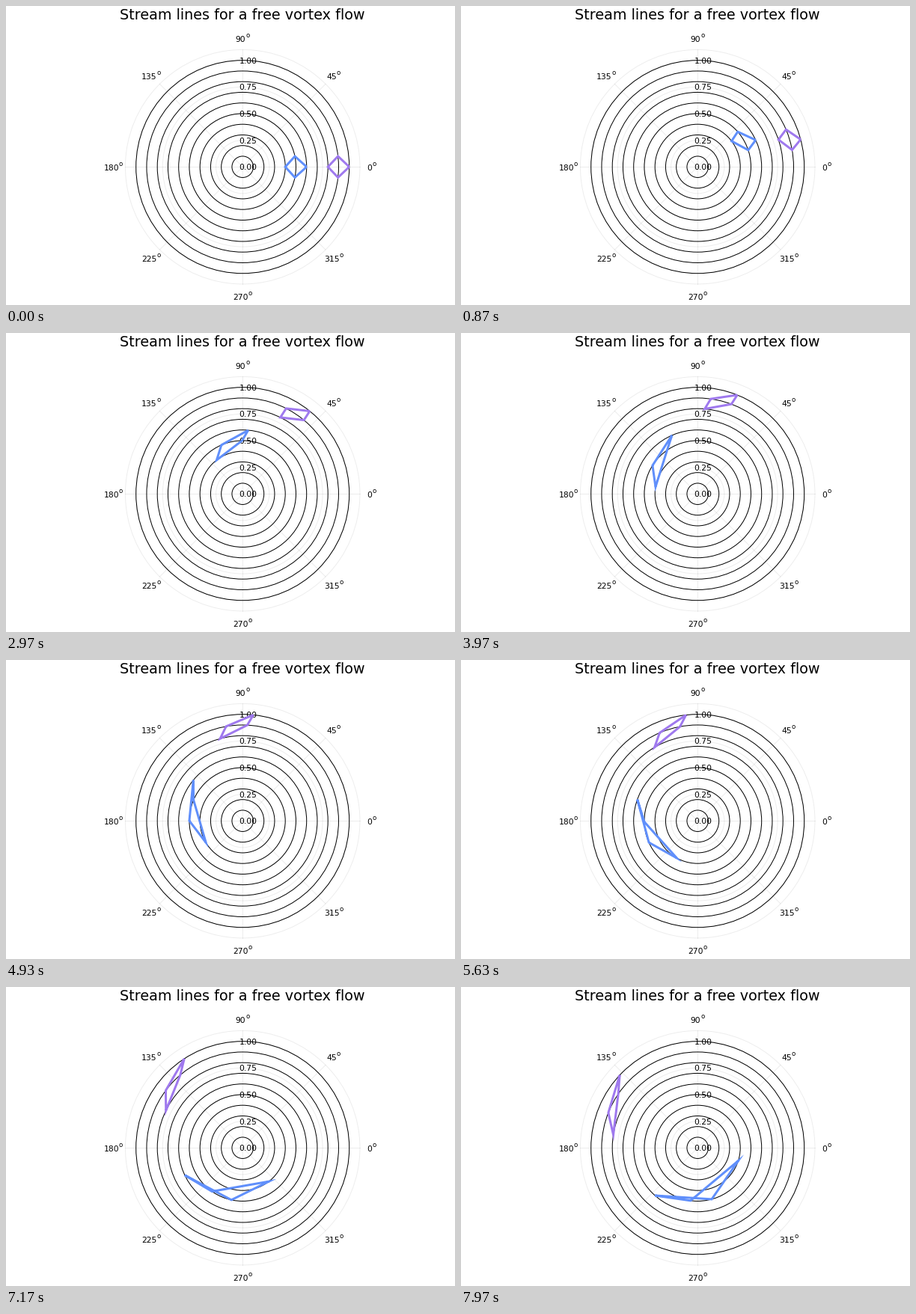
A matplotlib script for the animation above (8 s loop, 600 by 400 pixels).

```python
import numpy as np
import matplotlib.pyplot as plt
from matplotlib.animation import FuncAnimation
from matplotlib.patches import Circle, PathPatch
from matplotlib.path import Path

W, H, DPI = 600, 400, 100
PT = 72 / DPI                        # points per pixel
CX, CY, UNIT = 316.2, 215.2, 142.5   # pole of the plot and length of r = 1
RMAX = 1.1
FRAMES, LOOP = 240, 8000
SPEED = 0.01                         # arc length travelled per frame
LINE, MITER_LIMIT = 3.0, 10
TICK, SUP, TITLE = 10.7, 8.6, 19.2

plt.rcParams["font.family"] = "DejaVu Sans"
fig = plt.figure(figsize=(W / DPI, H / DPI), dpi=DPI, facecolor="white")
ax = fig.add_axes([0, 0, 1, 1])
ax.set_xlim(0, W)
ax.set_ylim(H, 0)
ax.axis("off")


def polar(r, theta):
    return np.array([CX + UNIT * r * np.cos(theta), CY - UNIT * r * np.sin(theta)])


def ring(r, color, z):
    ax.add_patch(Circle((CX, CY), UNIT * r, fill=False, ec=color, lw=PT, zorder=z))


def label(x, y, s, size):
    """Text with the middle of its capitals at height y."""
    ax.text(x, y + 0.365 * size, s, fontsize=size * PT, ha="center",
            va="baseline", zorder=2)


def draw_grid():
    faint = (0, 0, 0, 0.07)
    for r in (0.25, 0.5, 0.75, 1.0, RMAX):
        ring(r, faint, 1)
    for deg in range(0, 360, 45):
        a = np.radians(deg)
        end = polar(RMAX, a)
        ax.plot([CX, end[0]], [CY, end[1]], color=faint, lw=PT, zorder=1)
        x = 316 + 172.5 * np.cos(a) - 2.8
        y = 216.5 - 172.5 * np.sin(a)
        half = 0.318 * TICK * len(str(deg))
        label(x, y, str(deg), TICK)
        ax.text(x + half, y - 2.2, "o", fontsize=SUP * PT, va="baseline", zorder=2)
    for r in np.arange(0, 1.01, 0.25):
        label(323.6, CY + 0.2 - UNIT * r, f"{r:.2f}", TICK)
    for k in range(1, 11):
        ring(k / 10, "black", 3)
    label(316, 11.2, "Stream lines for a free vortex flow", TITLE)


def closed(points):
    """Closed path, always wound the same way."""
    p = np.array(points)
    x, y = p.T
    if np.dot(x, np.roll(y, -1)) < np.dot(y, np.roll(x, -1)):
        p = p[::-1]
    return Path(np.vstack([p, p[:1]]), closed=True)


def stroke(pts):
    """Outline of a polyline with butt ends and long mitred corners."""
    d = np.diff(pts, axis=0)
    d /= np.linalg.norm(d, axis=1)[:, None]
    n = np.column_stack([-d[:, 1], d[:, 0]]) * LINE / 2
    parts = [closed([a + m, a - m, b - m, b + m])
             for a, b, m in zip(pts[:-1], pts[1:], n)]
    for i in range(1, len(pts) - 1):
        p, d0, d1 = pts[i], d[i - 1], d[i]
        side = -np.sign(d0[0] * d1[1] - d0[1] * d1[0])
        n0, n1 = side * n[i - 1], side * n[i]
        spread = 1 + np.dot(d0, d1)
        corner = [p, p + n0, p + n1]
        if spread > 2 / MITER_LIMIT ** 2:
            corner.insert(2, p + (n0 + n1) / spread)
        parts.append(closed(corner))
    return Path.make_compound_path(*parts)


def element(r0, frame):
    """Fluid element: each corner moves along its own circle."""
    size = 0.1
    half = size / r0
    radii = np.array([r0 + size, r0, r0 - size, r0, r0 + size])
    start = np.array([0, half, 0, -half, 0])
    return stroke(polar(radii, start + SPEED * frame / radii).T)


draw_grid()
elements = []
for r0, color in ((0.5, "#608ffb"), (0.9, "#9f79ee")):
    patch = PathPatch(element(r0, 0), fc=color, ec="none", lw=0, snap=False, zorder=4)
    ax.add_patch(patch)
    elements.append((r0, patch))


def update(frame):
    for r0, patch in elements:
        patch.set_path(element(r0, frame))
    return [patch for _, patch in elements]


anim = FuncAnimation(fig, update, frames=FRAMES, interval=LOOP / FRAMES,
                     repeat=True, repeat_delay=0, blit=False)
plt.show()
```
